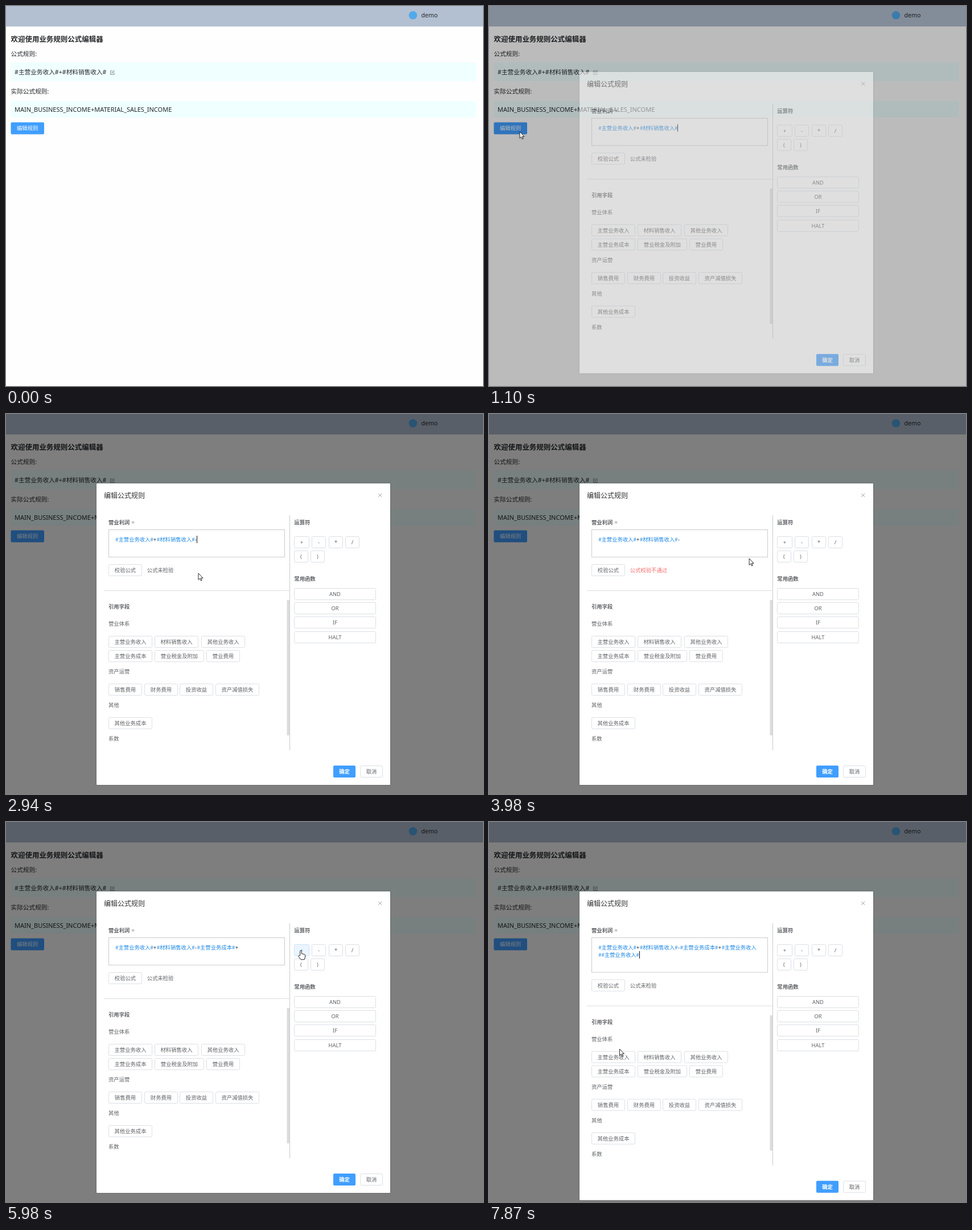
These frames come from a looping animation (838 by 668 pixels, 8 s). An HTML page:

```html
<!DOCTYPE html>
<html lang="zh-CN">
<head>
<meta charset="utf-8">
<title>公式编辑器</title>
<style>
html, body { margin: 0; width: 100%; height: 100%; overflow: hidden; background: #fefefe; }
svg { display: block; }
text { font-family: "Noto Sans", "Noto Sans CJK SC", sans-serif; fill: #606266; white-space: pre; }
.page { fill: #26282b; }
.dark { fill: #303133; }
.white { fill: #fff; }
.bold { font-weight: 700; }
.mid { text-anchor: middle; }
#formula text { font-family: "Noto Sans CJK SC", sans-serif; fill: #222; }
#formula .field { fill: #1e88e5; }
.btn rect { fill: #fff; stroke: #dcdfe6; }
.btn.hot rect { fill: #ecf5ff; stroke: #c6e2ff; }
.btn.hot text { fill: #409eff; }
#panel { filter: drop-shadow(0 .7px 1px rgba(0, 0, 0, .3)); }
#status.failed { fill: #f56c6c; }
#hand, #arrow { fill: #fff; stroke: #111; stroke-width: .9; stroke-linejoin: round; }
</style>
</head>
<body>
<svg id="stage" width="838" height="668" viewBox="0 0 838 668"></svg>
<script>
const LOOP = 8000, EM = 9.33, LINE = 12.7;
const OPEN = 1008, CHECK = 3500, EDIT = 5300, LAST = 7730;

// Formula pieces and the time each is added
const pieces = [
  ['#主营业务收入#+#材料销售收入#', 0], ['-', 1780], ['#主营业务成本#', EDIT],
  ['+', 5960], ['#主营业务收入#', 7330], ['#主营业务收入#', LAST]
];

// Pointer stops: arrival, departure, x, y
const stops = [
  [0, 70, 626, 528], [850, 1270, 54, 221], [1650, 1900, 545, 227],
  [2940, 2940, 338, 280], [3240, 3560, 222, 276], [4120, 4600, 500, 250],
  [5240, 5420, 222, 432], [5820, 6310, 518, 226], [6860, LOOP, 229.5, 399]
];

const $ = id => document.getElementById(id);
const set = (id, name, value) => $(id).setAttribute(name, value);
const show = (id, on) => set(id, 'visibility', on ? 'inherit' : 'hidden');

const advance = { '#': 5.4, '+': 6 };
const width = s => [...s].reduce((w, c) => w + (advance[c] || (c > '~' ? EM : 4)), 0);

const text = (x, cy, s, cls = '', size = EM, extra = '') =>
  `<text x="${x}" y="${cy + size * .365}" class="${cls}" font-size="${size}" ${extra}>${s}</text>`;
const rect = (x, y, w, h, fill, extra = '') =>
  `<rect x="${x}" y="${y}" width="${w}" height="${h}" fill="${fill}" ${extra}/>`;

function button(x, y, w, label) {
  x = Math.round(x);
  y = Math.round(y);
  w = Math.round(w);
  return `<g class="btn">${rect(x + .5, y + .5, w - 1, 20, '#fff', 'rx="2"')}` +
    `${text(x + w / 2, y + 10.6, label, 'mid')}</g>`;
}

// Buttons side by side, each as wide as its label
function row(x, y, labels) {
  return labels.split(' ').map(s => {
    const w = width(s) + 21.3, b = button(x, y, w, s);
    x += w + 4;
    return b;
  }).join('');
}

const page =
  rect(0, 0, 838, 668, '#fefefe') +
  rect(0, 0, 838, 36, '#b3c0d1') +
  '<circle cx="715" cy="16.3" r="7.3" fill="#52a9ea"/>' +
  text(729.5, 16, 'demo', 'page', 10.67) +
  text(8.5, 58, '欢迎使用业务规则公式编辑器', 'page bold', 12.48) +
  text(8.5, 84, '公式规则:', 'page', 10.67) +
  rect(8.5, 99.5, 817, 32.5, '#f0ffff') +
  text(15, 116.3, '#主营业务收入#+#材料销售收入#', 'page', 10.67) +
  '<path d="M187 114h-3.5v6.5h6.5v-3.5M185.7 118.3l.3-1.5 3.5-3.5 1.1 1.1-3.5 3.5z" fill="none" stroke="#777" stroke-width=".8"/>' +
  text(8.5, 150, '实际公式规则:', 'page', 10.67) +
  rect(8.5, 167, 817, 29, '#f0ffff') +
  text(15, 182, 'MAIN_BUSINESS_INCOME+MATERIAL_SALES_INCOME', 'page', 11) +
  rect(8.5, 204.5, 58.5, 21, '#409eff', 'rx="2" id="edit"') +
  text(37.7, 215, '编辑规则', 'mid white');

const lower =
  row(180, 264, '校验公式') +
  text(247.8, 275, '', '', EM, 'id="status"') +
  rect(172, 310, 326, 1, '#dcdcdc') +
  rect(493.5, 327, 4.5, 238, '#dcdcdc', 'rx="1"') +
  text(180, 339, '引用字段', 'bold') +
  text(180, 369, '营业体系') +
  row(180, 390, '主营业务收入 材料销售收入 其他业务收入') +
  row(180, 415, '主营业务成本 营业税金及附加 营业费用') +
  text(180, 453, '资产运营') +
  row(180, 474, '销售费用 财务费用 投资收益 资产减值损失') +
  text(180, 512, '其他') +
  row(180, 533, '其他业务成本') +
  text(180, 571, '系数') +
  rect(575, 618, 39, 21, '#409eff', 'rx="2"') +
  text(594.5, 628.5, '确定', 'mid bold white') +
  row(622, 618, '取消');

const right =
  text(506.3, 190.5, '运算符', 'bold') +
  row(506, 215, '+ - * /') + row(506, 240, '( )') +
  text(506.3, 290, '常用函数', 'bold') +
  ['AND', 'OR', 'IF', 'HALT'].map((s, i) => button(506, 306 + i * 25.2, 144, s)).join('');

const dialog =
  rect(159, 122, 516, 530, '#fff', 'id="panel" rx="1"') +
  text(172, 144, '编辑公式规则', 'dark', 12) +
  '<path d="M654.3 139.8l6 6m0-6l-6 6" stroke="#909399" stroke-width=".9"/>' +
  text(180, 190.5, '营业利润', 'bold') + text(220.5, 190.5, '=') +
  rect(180.5, 203.5, 309, 48, '#fff', 'id="box" stroke="#ccc"') +
  '<g id="formula"></g>' + rect(0, 0, 1, 13, '#111', 'id="caret"') +
  rect(498, 178, 1, 413, '#ccc', 'id="split"') +
  right + `<g id="lower">${lower}</g>`;

$('stage').innerHTML = page +
  rect(0, 0, 838, 668, '#000', 'id="shade"') +
  `<g id="dialog">${dialog}</g>` +
  '<path id="arrow" d="M0 0V11.5L2.6 9l1.9 4 1.7-.8-1.8-3.8H8z"/>' +
  '<path id="hand" d="M-1.3 8.5V1.2a1.3 1.3 0 0 1 2.6 0V5.5l4.5 1q2 .6 2 2.5l-.7 4-1 2.8H0l-3.8-5q-.8-1.6.9-2z"/>';

const buttons = [...document.querySelectorAll('.btn')];

// The CSS "ease" curve
function ease(p) {
  if (p <= 0 || p >= 1) return p <= 0 ? 0 : 1;
  let lo = 0, hi = 1, s = .5;
  for (let i = 0; i < 20; i++) {
    s = (lo + hi) / 2;
    const x = .75 * s * (1 - s) + s ** 3;
    if (x < p) lo = s; else hi = s;
  }
  return .3 * s * (1 - s) ** 2 + 3 * s * s * (1 - s) + s ** 3;
}

function pointer(t) {
  const i = stops.findLastIndex(s => t >= s[0]);
  const [, leave, x, y] = stops[i];
  if (t <= leave) return [x, y];
  const [arrive, , x2, y2] = stops[i + 1];
  const p = (t - leave) / (arrive - leave), k = p * p * (3 - 2 * p);
  return [x + (x2 - x) * k, y + (y2 - y) * k];
}

function inside(el, [x, y]) {
  const b = el.getBoundingClientRect();
  return x >= b.left && x <= b.right && y >= b.top && y <= b.bottom;
}

// Writes the formula, places the caret at its end and returns the line count
function writeFormula(t) {
  const s = pieces.filter(p => t >= p[1]).map(p => p[0]).join('');
  const cut = s.indexOf('##');
  const lines = cut < 0 ? [s] : [s.slice(0, cut), s.slice(cut)];
  let html = '', x, y;
  lines.forEach((line, i) => {
    x = 192.3;
    y = 221 + i * LINE;
    for (const part of line.match(/#*[^#+-]+#?|[+-]/g)) {
      html += text(x, y, part, part[0] === '#' ? 'field' : '');
      x += width(part);
    }
  });
  $('formula').innerHTML = html;
  set('caret', 'x', Math.round(x - .6));
  set('caret', 'y', Math.round(y - 7));
  show('caret', t < CHECK || t >= LAST);
  return lines.length;
}

function draw(t) {
  const p = ease((t - OPEN) / 300);
  set('shade', 'opacity', p / 2);
  set('dialog', 'opacity', p);
  set('dialog', 'transform', `translate(0 ${-13.3 * (1 - p)})`);

  const grow = (writeFormula(t) - 1) * LINE;
  set('panel', 'height', 530 + grow);
  set('box', 'height', 48 + grow);
  set('split', 'height', 413 + grow);
  set('lower', 'transform', `translate(0 ${grow})`);

  const failed = t >= CHECK && t < EDIT;
  $('status').textContent = failed ? '公式校验不通过' : '公式未检验';
  $('status').classList.toggle('failed', failed);

  const at = pointer(t), opened = t >= OPEN;
  const onEdit = !opened && inside($('edit'), at);
  set('edit', 'fill', onEdit ? '#66b1ff' : '#409eff');
  const hot = opened && buttons.find(b => inside(b, at));
  buttons.forEach(b => b.classList.toggle('hot', b === hot));

  for (const id of ['hand', 'arrow']) {
    set(id, 'transform', `translate(${at.join(' ')})`);
    show(id, t >= 70 && (id === 'hand') === Boolean(hot || onEdit));
  }
}

function tick() {
  draw(performance.now() % LOOP);
  requestAnimationFrame(tick);
}
tick();
</script>
</body>
</html>
```
